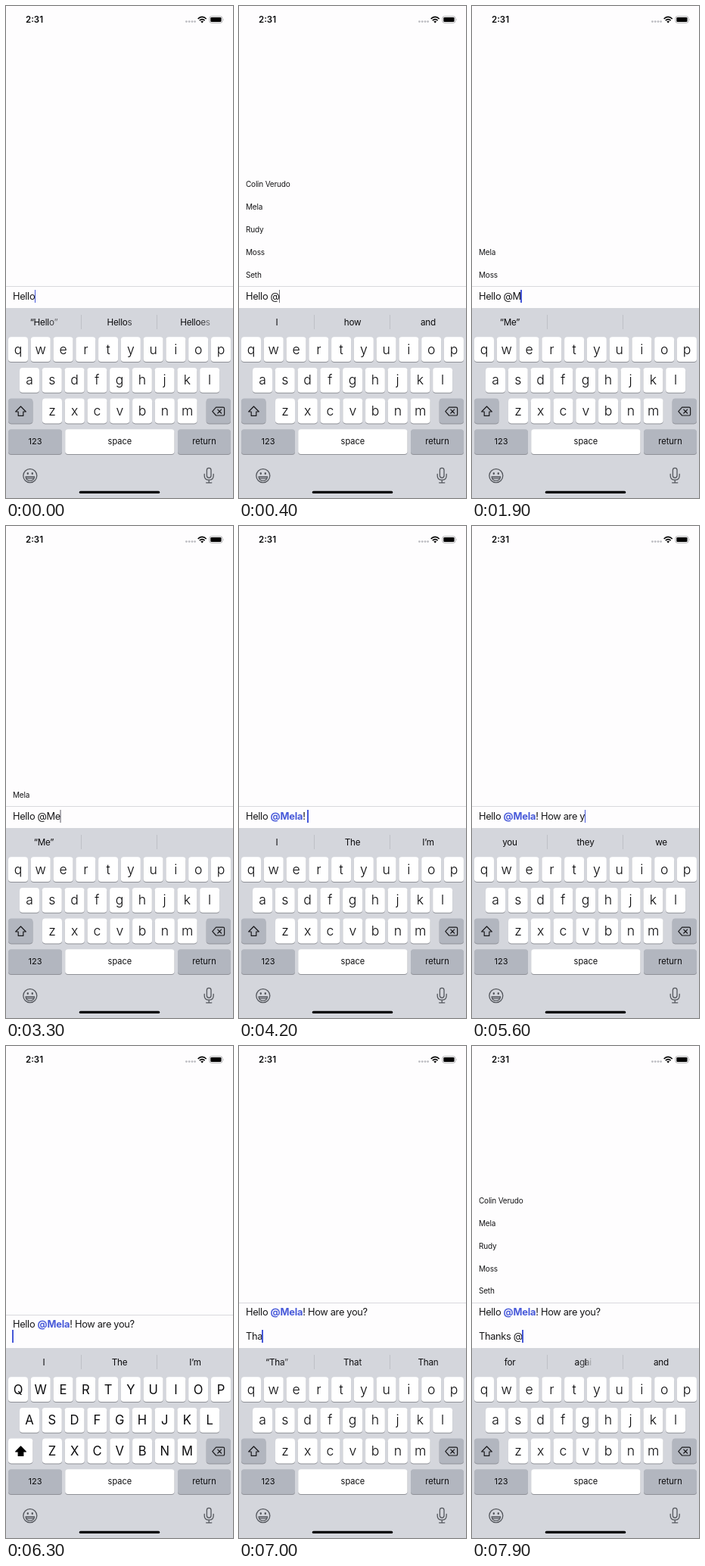
An HTML page that plays this animation: 300 px wide and 650 px high, repeating every 8000 ms.

```html
<!DOCTYPE html>
<html lang="en">
<head>
<meta charset="utf-8">
<title>Mention typing</title>
<style>
html, body { margin: 0; width: 100%; height: 100%; overflow: hidden; background: #fefdfe; }
body { position: relative; font-family: Inter, Roboto, sans-serif; color: #151517; }
svg { position: absolute; left: 0; top: 0; }
svg text { text-anchor: middle; fill: #0b0b0d; }
.key { font-size: 17.6px; font-weight: 300; }
.caps .key { font-size: 16.6px; font-weight: 400; }
.label { font-size: 11px; }
.hint { font-size: 11.7px; letter-spacing: -.02em; white-space: pre; }
.clock { font-size: 11.5px; font-weight: 600; }
.line { fill: none; stroke: #1a1a1d; stroke-width: 1.2; stroke-linejoin: round; stroke-linecap: round; }
.soft { stroke: #54575d; stroke-width: 1.3; }
#shiftKey { fill: #b2b6bf; }
.caps #shiftKey { fill: #fff; }
.caps #shift { fill: #000; stroke: #000; }
#bar { position: absolute; left: 0; width: 300px; border-top: 1px solid #d9d9dd; }
#list { position: absolute; left: 9px; bottom: 1px; font-size: 10px; letter-spacing: -.02em; line-height: 29.8px; white-space: pre; }
#text { position: absolute; left: 9px; top: 4.2px; font-size: 12.8px; letter-spacing: -.025em; line-height: 15.6px; white-space: pre; }
#text b { color: #4759d9; letter-spacing: -.01em; }
#caret { display: inline-block; position: relative; width: 0; height: 15.6px; vertical-align: top; }
#caret::before { content: ""; position: absolute; left: -.6px; top: -.7px; width: var(--w); height: 16.8px; background: var(--c); opacity: var(--a); }
</style>
</head>
<body>
<svg id="stage" width="300" height="650" viewBox="0 0 300 650">
  <text class="clock" x="37.5" y="22">2:31</text>
  <g fill="#bcbcc1"><circle cx="238.4" cy="20.6" r="1.4"/><circle cx="242.2" cy="20.6" r="1.4"/><circle cx="246" cy="20.6" r="1.4"/><circle cx="249.6" cy="20.6" r="1.4"/></g>
  <g fill="none" stroke="#000" stroke-width="1.7"><path d="M253.7 17 Q259.2 11.8 264.7 17M255.8 19.2 Q259.2 16 262.6 19.2"/></g>
  <path d="M257.3 20.6 Q259.2 19 261.1 20.6 L259.2 22.5Z"/>
  <rect x="268.9" y="13.7" width="17" height="8.6" rx="2.5" fill="none" stroke="#a5a5a9" stroke-width=".9"/>
  <rect x="270.3" y="15" width="14.2" height="6" rx="1.3"/>
  <path d="M287 16.5 q1.3 1.5 0 3z" fill="#a5a5a9"/>
  <rect y="399" width="300" height="251" fill="#d4d6dc"/>
  <path d="M99.5 408V427M199.5 408V427" stroke="#bec0c7"/>
  <g id="keys"></g>
  <g id="hints"></g>
  <path id="shift" class="line" d="M19.5 529 L26.3 536 H22.8 V541.4 H16.2 V536 H12.7 Z"/>
  <path class="line" d="M277.6 530.2 H287 Q288.6 530.2 288.6 531.8 V539.4 Q288.6 541 287 541 H277.6 L272.8 535.6 ZM279.8 533.2 L284.6 538M284.6 533.2 L279.8 538"/>
  <circle class="line soft" cx="31.8" cy="620.6" r="9"/>
  <path class="line soft" d="M26 622 H37.6 Q36.8 627.2 31.8 627.2 Q26.8 627.2 26 622ZM27.2 624.2 H36.4"/>
  <g fill="#54575d"><ellipse cx="28.8" cy="617.6" rx="1.2" ry="1.7"/><ellipse cx="34.8" cy="617.6" rx="1.2" ry="1.7"/></g>
  <rect class="line soft" x="265.4" y="610.3" width="5.6" height="13" rx="2.8"/>
  <path class="line soft" d="M262.2 618.5 V620.5 Q262.2 626.2 268.2 626.2 Q274.2 626.2 274.2 620.5 V618.5M268.2 626.2 V629.8M264.6 629.8 H271.8"/>
  <rect x="96.7" y="640.7" width="106.6" height="3.4" rx="1.7"/>
</svg>
<div id="bar"><div id="list"></div><div id="text"><span id="before"></span><b id="mention"></b><span id="after"></span><i id="caret"></i></div></div>
<script>
const $ = id => document.getElementById(id);
const LOOP = 8000, STEP = 100, MENTION = "@Mela";
const NAMES = ["Colin Verudo", "Mela", "Rudy", "Moss", "Seth"];
const done = "Hello @Mela! How are you?";

// [time, composed text]
const typing = [
  [0, "Hello"], [100, "Hello "], [200, "Hello @"], [700, "Hello @M"],
  [1300, "Hello @Me"], [1900, "Hello @M"], [2500, "Hello @Me"], [2700, "Hello @M"],
  [2900, "Hello @Me"], [3700, "Hello @Mela"], [3900, "Hello @Mela!"],
  [4200, "Hello @Mela! "], [4400, "Hello @Mela! H"], [4500, "Hello @Mela! Ho"],
  [4600, "Hello @Mela! How"], [4900, "Hello @Mela! How "],
  [5100, "Hello @Mela! How a"], [5200, "Hello @Mela! How are"],
  [5500, "Hello @Mela! How are "], [5600, "Hello @Mela! How are y"],
  [5700, "Hello @Mela! How are yo"], [5800, "Hello @Mela! How are you"],
  [5900, done], [6100, done + "\n"], [6400, done + "\n\n"],
  ...[[6800, 1], [6900, 2], [7000, 3], [7200, 4], [7300, 5], [7400, 6], [7600, 7], [7800, 8]]
    .map(([t, n]) => [t, done + "\n\n" + "Thanks @".slice(0, n)])
];

// [time, left|middle|right suggestion]
const hints = [
  [-999, "||"], [-120, "“Hello”|Hellos|Helloes"], [180, "I|how|and"], [940, "“M”||"],
  [1380, "“Me”||"], [2060, "“M”||"], [2540, "“Me”||"], [2660, "“M”||"], [2880, "“Me”||"],
  [3640, "||"], [4020, "I|The|I’m"], [4360, "“H”|He|How"], [4480, "“Ho”|How|Hope"],
  [4640, "“How”|However|How’s"], [4860, "are|do|about"], [5080, "“a”|are|and"],
  [5180, "“are”|area|about"], [5460, "you|they|we"], [5660, "“yo”|you|your"],
  [5860, "“you”|your|you’re"], [6040, "I|The|I’m"], [6780, "“T”|The|This"],
  [6900, "“Tha”|That|Than"], [7440, "for|I|and"], [7840, "for|again|and"]
].map(([t, s]) => [t, s.split("|")]);

// [start, length] of caret fades
const fades = [[300, 300], [800, 300], [1400, 300], [3200, 165]];

const clamp = v => Math.max(0, Math.min(1, v));
const indexAt = (track, t) => track.findLastIndex(e => e[0] <= t);

function add(parent, tag, attrs, content = "") {
  const el = document.createElementNS("http://www.w3.org/2000/svg", tag);
  for (const k in attrs) el.setAttribute(k, attrs[k]);
  el.textContent = content;
  return parent.appendChild(el);
}

function addKey(x, y, w, fill, id) {
  add($("keys"), "rect", { x, y: y + 1, width: w, height: 32.8, rx: 3.8, fill: "#8f9197" });
  const face = add($("keys"), "rect", { x, y, width: w, height: 32.8, rx: 3.8 });
  if (id) face.id = id; else face.setAttribute("fill", fill);
}

const letters = [];
["qwertyuiop", "asdfghjkl", "zxcvbnm"].forEach((row, r) => {
  [...row].forEach((ch, i) => {
    const cx = [16, 31, 61][r] + i * 29.77, y = 437.2 + r * 40.7;
    addKey(cx - 13, y, 26, "#fff");
    letters.push([add($("keys"), "text", { class: "key", x: cx, y: y + 22.3 }, ch), ch]);
  });
});
addKey(3, 518.6, 32.4, "", "shiftKey");
addKey(264.7, 518.6, 32.3, "#b2b6bf");
[[3, 71, "123"], [78.2, 144.3, "space"], [227, 70, "return"]].forEach(([x, w, s], i) => {
  addKey(x, 559.3, w, i === 1 ? "#fff" : "#b2b6bf");
  add($("keys"), "text", { class: "label", x: x + w / 2, y: 579.3 }, s);
});

const slots = [50, 150, 250].map(x => [0, 1].map(() =>
  add($("hints"), "text", { class: "hint", x, y: 421.8 })));

function drawHints(t) {
  const i = indexAt(hints, t), age = t - hints[i][0];
  const now = hints[i][1], last = hints[Math.max(0, i - 1)][1];
  slots.forEach(([fresh, old], c) => {
    const same = now[c] === last[c];
    fresh.textContent = "";
    [...now[c]].forEach((ch, n) =>
      add(fresh, "tspan", { "fill-opacity": same ? 1 : clamp((age - 15 * n) / 60) }, ch));
    old.textContent = same ? "" : last[c];
    old.setAttribute("opacity", clamp(1 - (age - 60) / 40));
  });
}

function drawText(t) {
  const text = typing[indexAt(typing, t)][1];
  const at = text.indexOf(MENTION), end = at + MENTION.length;
  $("before").textContent = at < 0 ? text : text.slice(0, at);
  $("mention").textContent = at < 0 ? "" : MENTION;
  $("after").textContent = at < 0 ? "" : text.slice(end);

  const query = text.match(/@(\w*)$/);
  $("list").textContent = query && !text.endsWith(MENTION)
    ? NAMES.filter(n => n.startsWith(query[1])).join("\n") : "";
  $("bar").style.top = 370.4 - 15.6 * (text.split("\n").length - 1) + "px";
}

function drawCaret(t) {
  const typedAt = typing[indexAt(typing, t)][0];
  const fade = fades.find(f => f[0] <= t && f[0] >= typedAt);
  const a = fade ? clamp(1 - (t - fade[0]) / fade[1]) : 1;
  const s = $("caret").style;
  s.setProperty("--a", a);
  s.setProperty("--w", a < 1 ? "1.2px" : "1.8px");
  s.setProperty("--c", a < 1 ? "#2c2d38" : "#4658d8");
}

let drawn = -1, start;
function draw(t) {
  const caps = t >= 6000 && t < 6800;
  $("stage").classList.toggle("caps", caps);
  letters.forEach(([el, ch]) => { el.textContent = caps ? ch.toUpperCase() : ch; });
  drawHints(t);
  drawText(t);
  drawCaret(t);
}
function tick(now) {
  start ??= now;
  const t = Math.floor((now - start) % LOOP / STEP) * STEP;
  if (t !== drawn) draw(drawn = t);
  requestAnimationFrame(tick);
}
draw(0);
requestAnimationFrame(tick);
</script>
</body>
</html>
```
